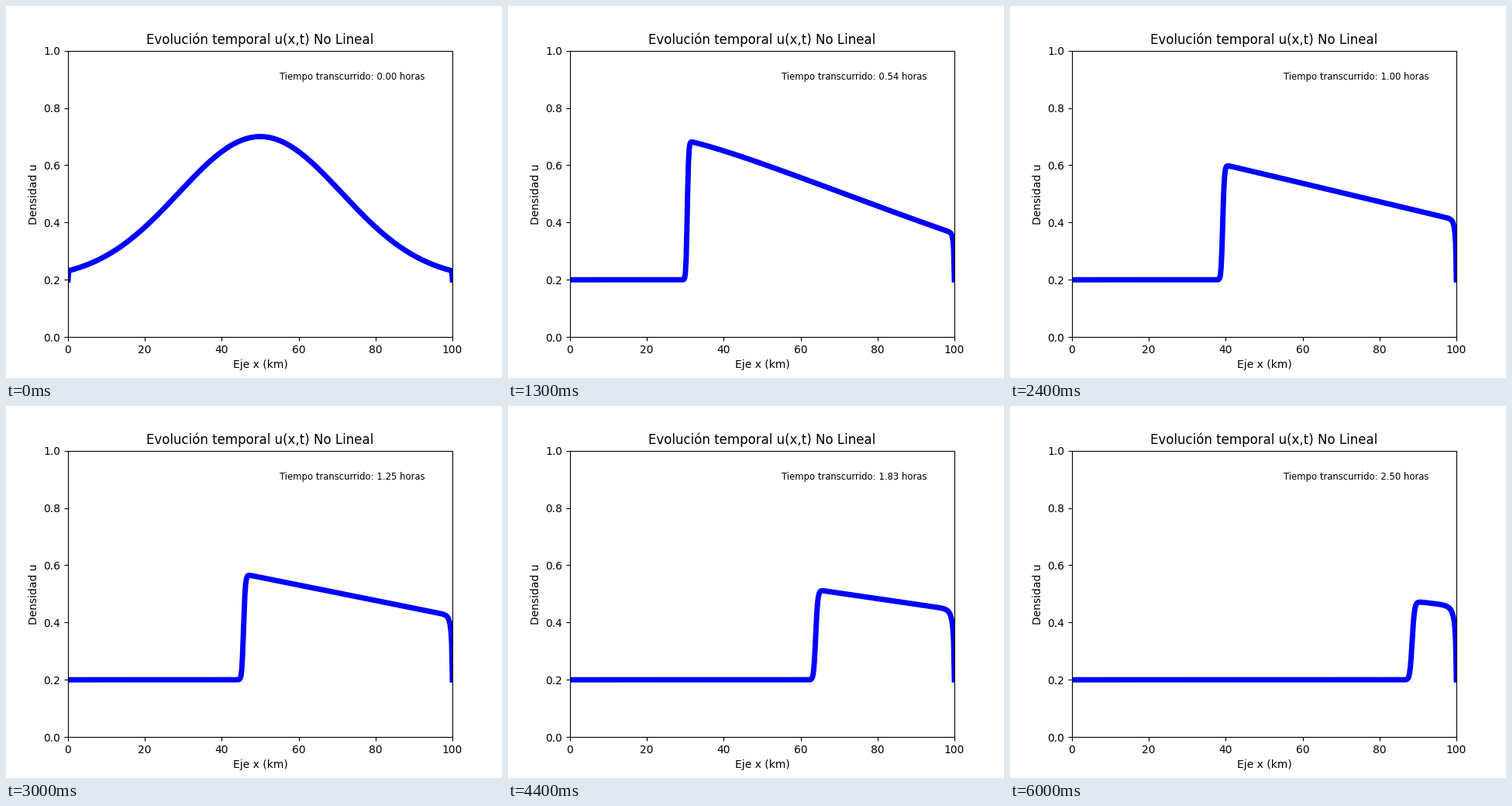
Animation of 640x480 px, one loop 6100 ms. Source, as a matplotlib script:

```python
import numpy as np
import matplotlib.pyplot as plt
from matplotlib.animation import FuncAnimation

LENGTH = 100.0      # km
HOURS = 2.5
FRAMES = 61
INTERVAL = 100      # ms
V_MAX = 120.0       # km/h
DIFFUSION = 10.0    # km^2/h
BASE = 0.2
SUBSTEPS = 150

x = np.linspace(0, LENGTH, 501)
dx = x[1] - x[0]
dt = HOURS / ((FRAMES - 1) * SUBSTEPS)


def initial_density():
    u = BASE + 0.5 * np.exp(-((x - LENGTH / 2) / 30) ** 2)
    u[0] = u[-1] = BASE
    return u


def step(u):
    """Advance u_t + (V u (1 - u))_x = D u_xx with fixed ends."""
    flux = V_MAX * u * (1 - u)
    new = u.copy()
    new[1:-1] += dt * (DIFFUSION * (u[2:] - 2 * u[1:-1] + u[:-2]) / dx ** 2
                       - (flux[2:] - flux[:-2]) / (2 * dx))
    return new


def solve():
    u = initial_density()
    states = [u]
    for _ in range(FRAMES - 1):
        for _ in range(SUBSTEPS):
            u = step(u)
        states.append(u)
    return states


states = solve()

fig, ax = plt.subplots(figsize=(6.4, 4.8), dpi=100)
ax.set_xlim(0, LENGTH)
ax.set_ylim(0, 1)
ax.set_title("Evolución temporal u(x,t) No Lineal")
ax.set_xlabel("Eje x (km)")
ax.set_ylabel("Densidad u")
line, = ax.plot(x, states[0], color="blue", lw=5)
label = ax.text(55, 0.9, "", fontsize="small")


def update(i):
    line.set_ydata(states[i])
    hours = HOURS * i / (FRAMES - 1)
    label.set_text(f"Tiempo transcurrido: {hours:.2f} horas")
    return line, label


anim = FuncAnimation(fig, update, frames=FRAMES, interval=INTERVAL,
                     repeat=True, repeat_delay=0)
plt.show()
```
